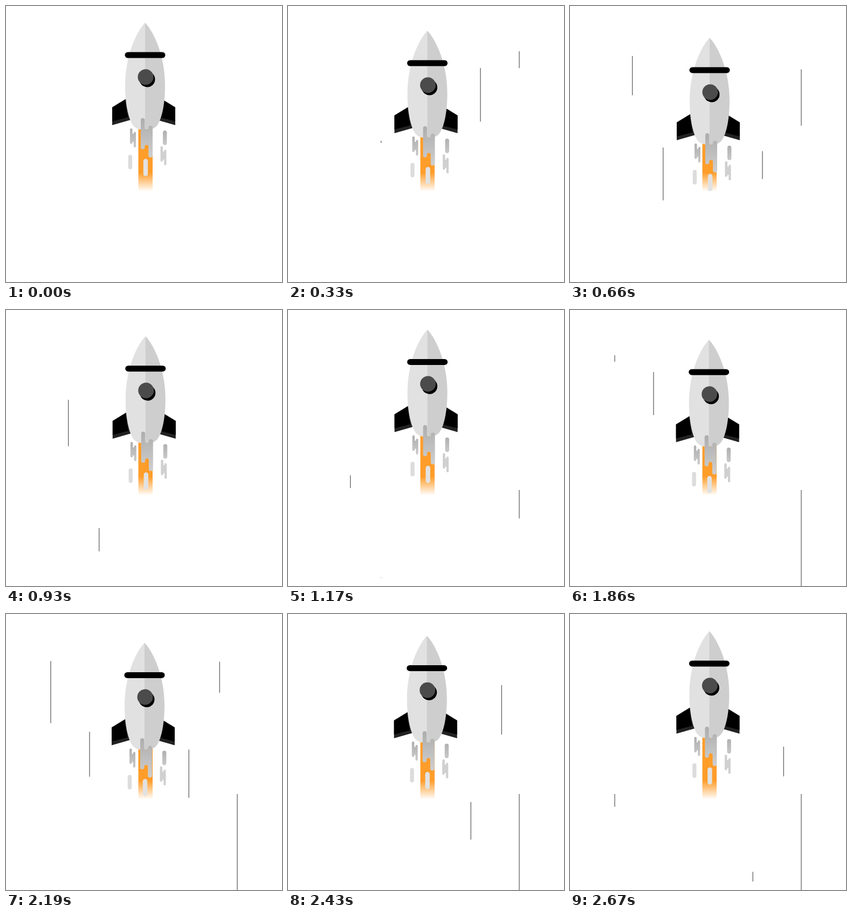
Recreate the animation shown at these times as an HTML page. Size 512x512 px, loop 2.7 s.

```html
<!DOCTYPE html>
<html lang="en">
<head>
<meta charset="utf-8">
<title>Rocket</title>
<style>
  html, body { margin: 0; width: 100%; height: 100%; overflow: hidden; background: #fff; }
  svg { display: block; width: 100%; height: 100%; }
</style>
</head>
<body>
<svg viewBox="0 0 512 512" xmlns="http://www.w3.org/2000/svg">
  <defs>
    <linearGradient id="fire" gradientUnits="userSpaceOnUse" x1="0" y1="228" x2="0" y2="344">
      <stop offset="0" stop-color="#ff9d2a"/>
      <stop offset=".7" stop-color="#ff9d2a"/>
      <stop offset="1" stop-color="#ff9d2a" stop-opacity="0"/>
    </linearGradient>
    <linearGradient id="smoke" gradientUnits="userSpaceOnUse" x1="0" y1="208" x2="0" y2="282">
      <stop offset="0" stop-color="#adadad"/>
      <stop offset="1" stop-color="#cfcfcf"/>
    </linearGradient>
    <linearGradient id="puff" x1="0" y1="0" x2="0" y2="1">
      <stop offset="0" stop-color="#b0b0b0"/>
      <stop offset="1" stop-color="#c9c9c9"/>
    </linearGradient>
    <g id="fin">
      <path fill="#222" d="M197 188L223 172L232 211L197 221Z"/>
      <path d="M197 188L221 173.500L226 206.500L197 214Z"/>
    </g>
    <path id="wisp" d="M0 2.300a2.300 2.300 0 0 1 4.600 0V9.500a1.200 1.200 0 0 0 2.200 0V8.500a2.100 2.100 0 0 1 4.200 0V33.500a2.100 2.100 0 0 1-4.200 0V25.500a1.200 1.200 0 0 0-2.200 0V26.500a2.300 2.300 0 0 1-4.600 0Z"/>
  </defs>
  <g id="lines" stroke="#6b6b6b" stroke-width="1.4"></g>
  <path fill="url(#fire)" d="M245.500 228H272V344H245.500Z"/>
  <g id="rocket">
    <use href="#fin"/>
    <use href="#fin" transform="translate(511 0) scale(-1 1)"/>
    <path fill="#e1e1e1" d="M258 31C240 50 221 95 221 148C221 185 228 213 237 223Q243 229 251 229H258.500V31Z"/>
    <path fill="#cecece" d="M258 31C276 50 295 95 295 148C295 185 288 213 279 223Q273 229 265 229H258Z"/>
    <rect x="220.500" y="85.500" width="75" height="11" rx="5.500"/>
    <circle cx="262" cy="136" r="14.500"/>
    <circle cx="259" cy="131.700" r="14.500" fill="#4b4b4b"/>
    <path fill="url(#smoke)" d="M250 211.700a3.700 3.700 0 0 1 7.400 0V226a3.400 3.400 0 0 0 6.800 0a3.900 3.900 0 0 1 7.800 0V277a3.900 3.900 0 0 1-7.800 0V261a3.400 3.400 0 0 0-6.800 0V262a3.700 3.700 0 0 1-7.400 0Z"/>
    <rect x="254.800" y="283.500" width="8.400" height="32" rx="4.200" fill="#e2e2e2"/>
    <rect x="291" y="231" width="7.400" height="27" rx="3.700" fill="url(#puff)"/>
    <rect x="226.700" y="276" width="7.400" height="27" rx="3.700" fill="#dcdcdc"/>
    <use href="#wisp" x="230" y="227" fill="url(#puff)"/>
    <use href="#wisp" x="286.500" y="260" fill="#d0d0d0"/>
  </g>
</svg>
<script>
const LOOP = 2700, STEP = 30, SPEED = 0.323, MIRROR_DELAY = 1590;
const rocket = document.getElementById('rocket');
const group = document.getElementById('lines');

const clamp = (v, a, b) => Math.min(b, Math.max(a, v));
const bez = (a, b, u) => 3 * a * u * (1 - u) ** 2 + 3 * b * u * u * (1 - u) + u ** 3;

function ease(p) {
  let lo = 0, hi = 1;
  for (let i = 0; i < 24; i++) {
    const m = (lo + hi) / 2;
    if (bez(0.22, 0.68, m) < p) lo = m; else hi = m;
  }
  return bez(0, 1, lo);
}

const linear = p => p;

function track(keys, t, fn) {
  for (let i = 1; i < keys.length; i++) {
    const [t0, a] = keys[i - 1], [t1, b] = keys[i];
    if (t <= t1) return a + (b - a) * fn((t - t0) / (t1 - t0));
  }
  return keys[keys.length - 1][1];
}

const bob = [[0, 0], [675, 28], [1350, 1], [2025, 28], [2700, 0.8]];
const sway = [[0, 0], [660, 1], [1170, 0.6], [1440, 0], [1860, -0.3], [2190, -1], [2700, 0.5]];

// Tail travel: accelerating, or a sine ease over a fixed distance
const accel = (t0, k) => t => k * Math.max(0, t - t0) ** 2;
const glide = (t0, time, dist) => t =>
  dist * (1 - Math.cos(Math.PI * clamp((t - t0) / time, 0, 1))) / 2;

const streaks = [
  { x: 115.7, top: 88, start: 420, tail: accel(572, 0.000612) },
  { x: 172.7, top: 250, start: 318, tail: glide(570, 620, 247), end: 497 },
  { x: 429, top: 84, start: 233, tail: glide(574, 360, 250) },
  { x: 357, top: 115, start: 22, tail: accel(328, 0.0014) }
];

function addLine(streak, x, delay) {
  const el = document.createElementNS('http://www.w3.org/2000/svg', 'line');
  el.setAttribute('x1', x);
  el.setAttribute('x2', x);
  group.appendChild(el);
  return { ...streak, el, delay };
}

const lines = streaks.flatMap(s => [
  addLine(s, s.x, 0),
  addLine(s, 512 - s.x, MIRROR_DELAY)
]);

function draw(t) {
  rocket.setAttribute('transform',
    `translate(${track(sway, t, linear).toFixed(2)} ${track(bob, t, ease).toFixed(2)})`);
  for (const { el, delay, top, start, tail, end = 512 } of lines) {
    const local = t - delay;
    const head = Math.min(end, top + SPEED * (local - start));
    const back = top + tail(local);
    const shown = local > start && head > back;
    el.setAttribute('visibility', shown ? 'visible' : 'hidden');
    if (shown) {
      el.setAttribute('y1', back.toFixed(2));
      el.setAttribute('y2', head.toFixed(2));
    }
  }
}

function tick() {
  const t = performance.now() % LOOP;
  draw(Math.floor(t / STEP) * STEP);
  requestAnimationFrame(tick);
}
tick();
</script>
</body>
</html>
```
